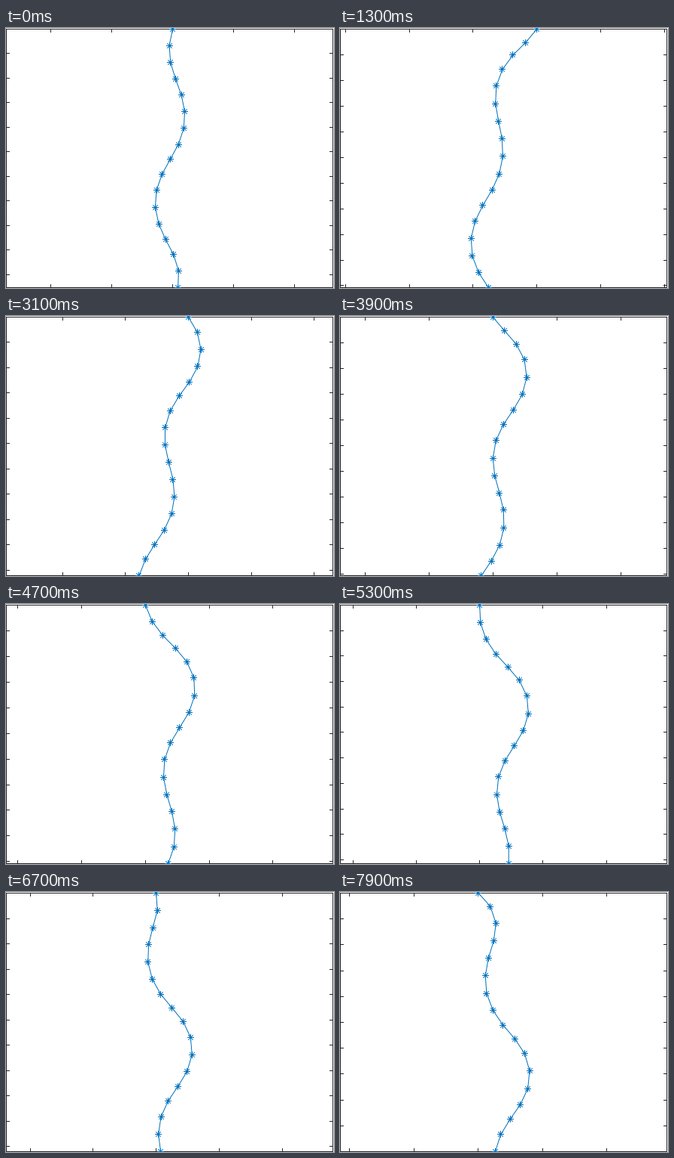
Animation of 436x344 px, one loop 8000 ms. Source, as a matplotlib script:

```python
import numpy as np
import matplotlib.pyplot as plt
from matplotlib.animation import FuncAnimation

W, H, DPI = 436, 344, 64
PX = 72 / DPI                                     # points per pixel
LEFT, RIGHT, TOP, BOTTOM = 0.5, 434.5, 1.5, 343.5
MID = 218.0
LINKS = 16
LINK = 0.1384                                     # link length in data units
BLUE, INK = "#0072BD", "#262626"

# Crests of the winding track: distance in links, heading in radians.
CREST_AT = [-15.7, -12.2, -7, -1.85, 2.75, 7.45, 12.9, 17]
CREST = np.array([0.85, -0.29, 0.72, -0.61, 0.29, -0.57, 0.48, -0.5])

# How far the body has crawled, how it leans and how it curls.
STEP = [0, 5, 14, 22, 28, 32, 38]
TRAVEL = [0, 2.75, 5.9, 9.25, 11.55, 13.5, 15.05]
LEAN = [0.04, -0.03, -0.03, 0.03, 0.03, 0, -0.01]
CURL = [-0.006, 0.023, 0, -0.007, 0, 0, 0]


def heading(s):
    """Track heading, eased from crest to crest."""
    at = np.interp(s, CREST_AT, np.arange(len(CREST)))
    k = np.minimum(at.astype(int), len(CREST) - 2)
    t = at - k
    return CREST[k] + (CREST[k + 1] - CREST[k]) * t * t * (3 - 2 * t)


def body(step):
    """Joint positions in pixels and the pixels per data unit."""
    travel, lean, curl = (np.interp(step, STEP, v) for v in (TRAVEL, LEAN, CURL))
    i = np.arange(LINKS)
    a = heading(i - travel) + lean + curl * (i - 7.5)
    size = (BOTTOM - TOP) / np.cos(a).sum()
    x = np.r_[0, np.cumsum(np.sin(a))] * size
    y = np.r_[0, np.cumsum(np.cos(a))] * size + TOP
    return x + MID - (x.min() + x.max()) / 2, y, size / LINK


def crisp(v):
    return np.floor(v) + 0.5


def set_segments(line, segs):
    """Show (x0, y0, x1, y1) rows as separate strokes of one line."""
    s = np.asarray(segs, float)
    gap = np.full(len(s), np.nan)
    line.set_data(np.c_[s[:, 0], s[:, 2], gap].ravel(),
                  np.c_[s[:, 1], s[:, 3], gap].ravel())


def tick_segments(x0, y0, unit, size=4.5):
    """Ticks on all four sides, counted from the head at the origin."""
    n = np.arange(-12, 13)
    xs = x0 + n * unit * 0.5
    ys = y0 + n * unit * 0.2
    segs = []
    for x in crisp(xs[(xs > LEFT) & (xs < RIGHT)]):
        segs += [(x, TOP, x, TOP + size), (x, BOTTOM - size, x, BOTTOM)]
    for y in crisp(ys[(ys >= TOP) & (ys < BOTTOM)]):
        segs += [(LEFT, y, LEFT + size, y), (RIGHT - size, y, RIGHT, y)]
    return segs


def star_segments(xs, ys):
    rays = [(4.5, 0), (0, 4.5), (3.2, 3.2), (3.2, -3.2)]
    return [(x - a, y - b, x + a, y + b)
            for x, y in zip(crisp(xs), crisp(ys)) for a, b in rays]


fig = plt.figure(figsize=(W / DPI, H / DPI), dpi=DPI, facecolor="white")
ax = fig.add_axes([0, 0, 1, 1])
ax.set_xlim(0, W)
ax.set_ylim(H, 0)
ax.axis("off")


def stroke(color):
    return ax.plot([], [], color=color, lw=PX, snap=False,
                   solid_capstyle="butt", solid_joinstyle="round")[0]


border, ticks, spine, stars = (stroke(c) for c in (INK, INK, BLUE, BLUE))
border.set_solid_joinstyle("miter")
border.set_data([LEFT, RIGHT, RIGHT, LEFT, LEFT, RIGHT],
                [TOP, TOP, BOTTOM, BOTTOM, TOP, TOP])


def draw(i):
    step = max(0, (i - 3) // 2)
    x, y, unit = body(step)
    set_segments(ticks, tick_segments(x[0], y[0], unit))
    spine.set_data(x, y)
    set_segments(stars, star_segments(x, y))
    return ticks, spine, stars


anim = FuncAnimation(fig, draw, frames=80, interval=100, repeat=True,
                     repeat_delay=0, blit=False)
plt.show()
```
